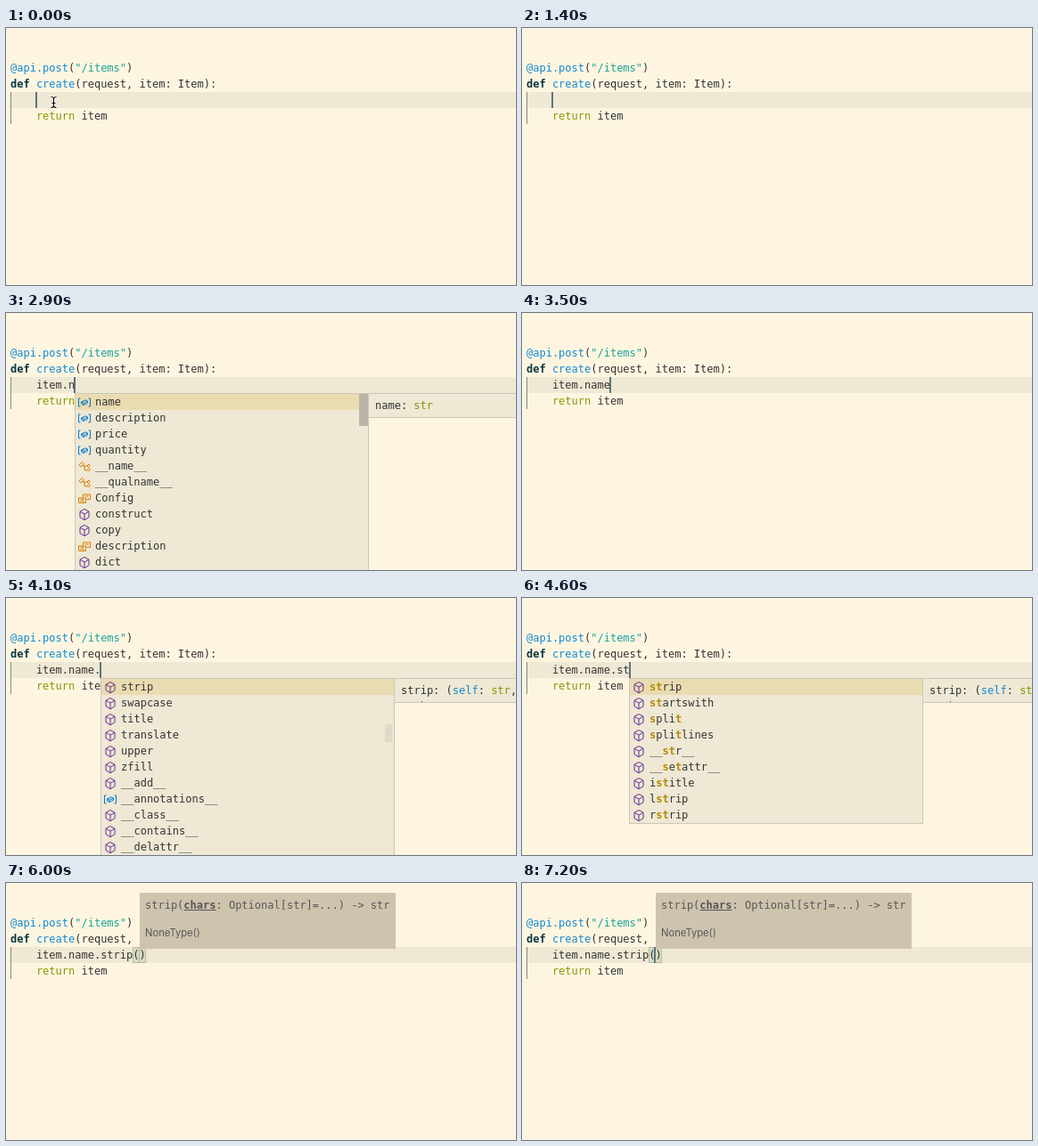
An HTML page with a canvas for the animation above (7.4 s loop, 572 by 289 pixels).

```html
<!DOCTYPE html>
<html lang="en">
<head>
<meta charset="utf-8">
<title>Editor completion</title>
<style>
html, body { margin: 0; width: 100%; height: 100%; overflow: hidden; background: #fef5e1; }
canvas { display: block; }
</style>
</head>
<body>
<canvas id="stage" width="572" height="289"></canvas>
<script>
const ctx = document.getElementById('stage').getContext('2d');
const LOOP = 7400, CHAR = 7.224, LEFT = 5, LINE = 18;
const MONO = '12px "DejaVu Sans Mono", monospace';
const INK = '#333333', BLUE = '#1489d2', GREEN = '#859900', TEAL = '#1ba398', GOLD = '#b58900';
const PANEL = '#eee8d5', EDGE = '#cbc7b9';

// Completion entries: icon kind (m method, v variable, c class, e enum, k keyword) and label
const parse = s => s.split(' ').map(w => ({ kind: w[0], label: w.slice(2) }));
const names = parse('v:item m:iter v:item m:iter c:Item c:Item c:int m:input c:InterruptedError k:import m:isinstance');
const fields = parse('v:name v:description v:price v:quantity c:__name__ c:__qualname__ e:Config m:construct m:copy e:description m:dict');
const methods = parse('m:strip m:swapcase m:title m:translate m:upper m:zfill m:__add__ v:__annotations__ m:__class__ m:__contains__ m:__delattr__');
const sMethods = parse('m:strip m:startswith m:split m:splitlines m:swapcase m:__str__ m:__setattr__ m:__sizeof__ m:istitle m:lstrip m:rstrip m:casefold');

const itemDoc = [['item: Item', INK]];
const nameDoc = [['name: ', INK], ['str', GREEN]];
const stripDoc = [['strip: (', INK], ['self', BLUE], [': ', INK], ['str', GREEN], [',', INK]];

const list = (items, query, doc, bar) => ({ items, query, doc, bar });

// Start time, typed text, completion list
const steps = [
  [0, ''],
  [1500, 'i'],
  [1700, 'i', list(names, 'i', null, [91, 130])],
  [1800, 'i', list(names, 'i', itemDoc, [91, 130])],
  [1900, 'it', list(names, 'it', itemDoc, [91, 172])],
  [2200, 'item'],
  [2400, 'item.'],
  [2600, 'item.', list(fields, '', null, [91, 36])],
  [2700, 'item.', list(fields, '', nameDoc, [91, 36])],
  [2900, 'item.n', list(fields, '', nameDoc, [91, 36])],
  [3000, 'item.n', list(fields, 'n', nameDoc)],
  [3100, 'item.na', list(fields, 'na', nameDoc)],
  [3500, 'item.name'],
  [3900, 'item.name.'],
  [4100, 'item.name.', list(methods, '', stripDoc, [142, 20])],
  [4200, 'item.name.s', list(sMethods, 's', stripDoc, [91, 75])],
  [4400, 'item.name.st', list(sMethods, 'st', stripDoc)],
  [4900, 'item.name.strip'],
  [5000, 'item.name.strip()']
];

function rect(x, y, w, h, color) {
  ctx.fillStyle = color;
  ctx.fillRect(x, y, w, h);
}

// Monospaced text on the character grid; returns the x after the last glyph
function text(s, x, y, color, bold) {
  ctx.font = (bold ? 'bold ' : '') + MONO;
  ctx.fillStyle = color;
  for (const c of s) {
    ctx.fillText(c, x, y);
    x += CHAR;
  }
  return x;
}

const runs = (parts, x, y) => parts.reduce((at, [s, color, bold]) => text(s, at, y, color, bold), x);

function matches(label, query) {
  const hits = [];
  let from = 0;
  for (const c of query) {
    const i = label.toLowerCase().indexOf(c, from);
    if (i < 0) return null;
    hits.push(i);
    from = i + 1;
  }
  return hits;
}

const shapes = {
  m: ['#652d90', 'M0-6L5-3.2V3.2L0 6.3L-5 3.2V-3.2ZM-5-3.2L0-.4L5-3.2M0-.4V6.3'],
  v: ['#007acc', 'M-4.5-4.5H-6.5V4.5H-4.5M4.5-4.5H6.5V4.5H4.5M-3.5-.5L1-2.7L3.5-1.3V.8L-1 3L-3.5 1.6ZM-3.5-.5L-1 .8L3.5-1.3M-1 .8V3'],
  c: ['#d67e00', 'M-6-1.5L-2.5-5L-.5-3L-4 .5ZM-2-.5H3M0-.5V4.2H3M3-.5L5-2.5L6.5-1L4.5 1ZM3 4L5 2L6.5 3.5L4.5 5.5Z'],
  e: ['#d67e00', 'M-1.5-1V-4.5H6.5V1H2.5M1-2.5H4.5M-6.5-.5H1.5V5H-6.5ZM-4.5 1.2H-.5M-4.5 3.2H-.5'],
  k: ['#424242', 'M-6.5-4.5H-1.5M1-4.5H6.5M-6.5-1.5H2M4-1.5H6.5M-6.5 1.5H-3.5M-1.5 1.5H4M-6.5 4.5H1M3 4.5H6.5']
};

function icon(kind, x, y) {
  const [color, d] = shapes[kind];
  ctx.save();
  ctx.translate(x, y);
  ctx.strokeStyle = color;
  ctx.lineWidth = 1;
  ctx.stroke(new Path2D(d));
  ctx.restore();
}

function popup({ items, query, doc, bar }, x) {
  const rows = items.map(it => ({ ...it, hits: matches(it.label, query) })).filter(r => r.hits);
  const bottom = rows.length < 11 ? 91 + rows.length * LINE : 300;
  rect(x, 90, 330, bottom - 89, EDGE);
  rect(x + 1, 91, 328, bottom - 91, PANEL);
  rect(x + 1, 91, 328, LINE, '#eadcb1');
  rows.forEach(({ kind, label, hits }, i) => {
    const y = 91 + i * LINE;
    icon(kind, x + 11, y + 9.5);
    [...label].forEach((c, j) => {
      const hit = hits.includes(j);
      text(c, x + 23 + j * CHAR, y + 13, hit ? GOLD : INK, hit);
    });
  });
  if (bar) rect(x + 319, bar[0], bar[0] > 91 ? 8 : 10, bar[1], bar[0] > 91 ? '#dfd9c7' : '#bab5a8');
  if (doc) {
    const left = x + 329;
    rect(left, 90, 600, 28, EDGE);
    rect(left + 1, 91, 600, 26, PANEL);
    runs(doc, left + 8, 108);
    if (doc === stripDoc) rect(left + 31, 116, 1, 1, INK);
  }
}

function pointer() {
  const beam = new Path2D('M50.5 77.5Q53 77.5 53.5 79Q54 77.5 56.5 77.5M53.5 79V88M50.5 89.5Q53 89.5 53.5 88Q54 89.5 56.5 89.5M51.5 84.5H55.5');
  for (const [color, width] of [['#ffffff', 2.6], ['#000000', 1.1]]) {
    ctx.strokeStyle = color;
    ctx.lineWidth = width;
    ctx.stroke(beam);
  }
}

function signature() {
  const gray = '#575757';
  rect(150, 11, 287, 63, '#cec3ad');
  runs([['strip(', gray], ['chars', gray, true], [': Optional[str]=...) -> str', gray]], 156, 29);
  rect(156 + 6 * CHAR, 30, 5 * CHAR, 1, gray);
  ctx.font = '11.2px Inter, sans-serif';
  ctx.fillStyle = gray;
  ctx.fillText('NoneType()', 156, 60);
}

function draw(t) {
  const [, typed, menu] = steps.filter(s => s[0] <= t).pop();
  const call = typed.endsWith(')');
  const caret = LEFT + (4 + typed.length - (call ? 1 : 0)) * CHAR;
  const indent = LEFT + 4 * CHAR;

  rect(0, 0, 572, 289, '#fef5e1');
  rect(6, 72, 566, LINE, '#efe8d4');
  rect(5, 72, 1, 36, '#87867d');
  runs([['@api.post', BLUE], ['(', INK], ['"/items"', TEAL], [')', INK]], LEFT, 49);
  runs([['def', '#073642', true], [' ', INK], ['create', BLUE], ['(request, item: Item):', INK]], LEFT, 67);
  runs([['return', GREEN], [' item', INK]], indent, 103);

  if (call && t >= 5100) {
    for (const x of [142, 149]) {
      rect(x, 72, 8, LINE, '#b9b9ad');
      rect(x + 1, 73, 6, LINE - 2, '#d7dbc0');
    }
  }
  text(typed, indent, 85, INK);

  const hidden = (t >= 500 && t < 1000) || (t >= 5700 && t < 6200) || (t >= 6700 && t < 7200);
  if (!hidden) rect(Math.floor(caret - 0.5), 72, 2, LINE, '#5d747e');
  if (menu) popup(menu, Math.floor(caret));
  if (t < 1400) pointer();
  if (t >= 5400) signature();
}

const start = performance.now();
function frame() {
  draw((performance.now() - start) % LOOP);
  requestAnimationFrame(frame);
}
frame();
</script>
</body>
</html>
```
